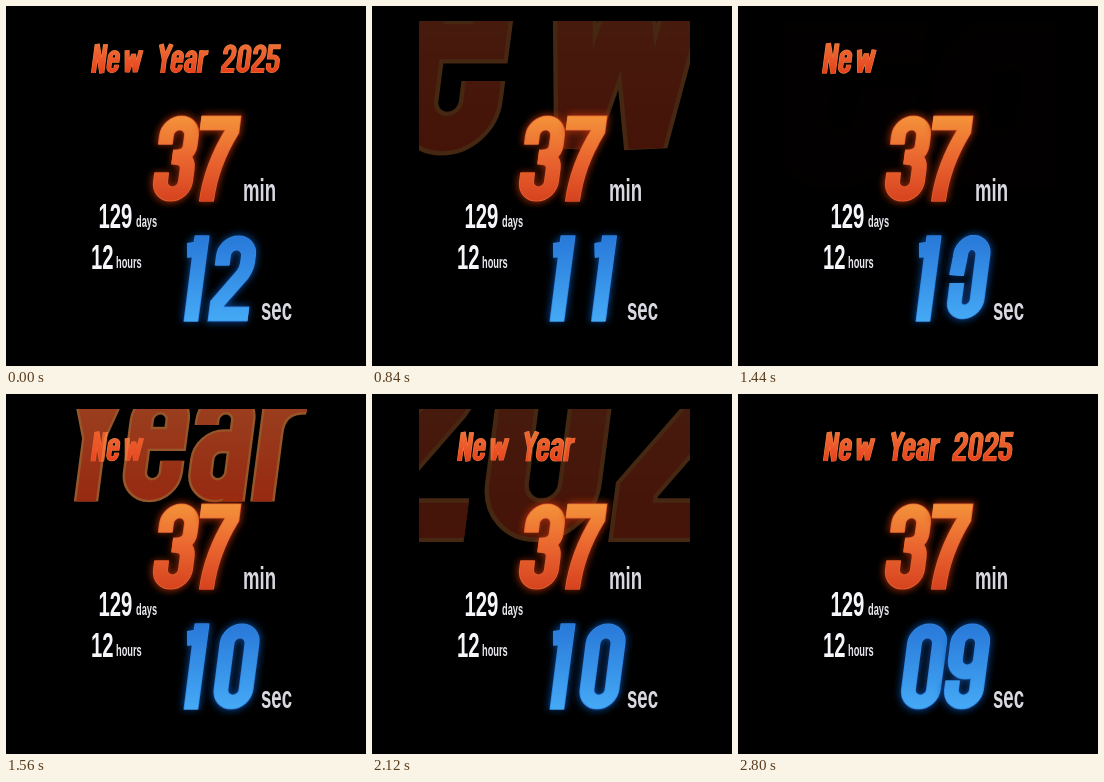
Animation, 360 px wide and 360 px high, one loop 2.88 s. Source, as an HTML page:

```html
<!DOCTYPE html>
<html lang="en">
<head>
<meta charset="utf-8">
<title>New Year countdown</title>
<style>
html, body { margin: 0; width: 100%; height: 100%; overflow: hidden; background: #000; }
svg { display: block; width: 100%; height: 100%; }
text { font-family: "Liberation Sans", Arial, sans-serif; font-weight: bold; }
path { fill: none; stroke-miterlimit: 4; }
</style>
</head>
<body>
<svg viewBox="0 0 360 360">
  <defs>
    <linearGradient id="warm" gradientUnits="userSpaceOnUse" x1="0" y1="0" x2="0" y2="86">
      <stop offset="0" stop-color="#f4933a"/><stop offset=".5" stop-color="#ea6630"/><stop offset="1" stop-color="#d6421f"/>
    </linearGradient>
    <linearGradient id="head" gradientUnits="userSpaceOnUse" x1="0" y1="0" x2="0" y2="86">
      <stop offset="0" stop-color="#ee7038"/><stop offset="1" stop-color="#e8401c"/>
    </linearGradient>
    <linearGradient id="cool" gradientUnits="userSpaceOnUse" x1="0" y1="0" x2="0" y2="86">
      <stop offset="0" stop-color="#2878d8"/><stop offset="1" stop-color="#45aaf6"/>
    </linearGradient>
    <filter id="glow" filterUnits="userSpaceOnUse" x="-60" y="-40" width="120" height="170">
      <feGaussianBlur stdDeviation="3.5"/>
    </filter>
    <clipPath id="stage"><rect x="47" y="15" width="271" height="304"/></clipPath>
  </defs>
  <rect width="360" height="360" fill="#000"/>
  <g id="title" clip-path="url(#stage)"></g>
  <g id="minutes"></g>
  <g id="seconds"></g>
  <g id="labels"></g>
</svg>
<script>
const LOOP = 2880, SLANT = 0.13, TITLE_SCALE = 0.335;
const $ = id => document.getElementById(id);

// Centre lines of the condensed letters: x around 0, y from 0 to 86
const GLYPHS = {
  0: 'M-12.5 43V20A12.5 12.5 0 0 1 12.5 20V66A12.5 12.5 0 0 1 -12.5 66Z',
  1: 'M-13 15L0 13V0V86',
  2: 'M-12.5 30V20A12.5 12.5 0 0 1 12.5 20V27Q12.5 33 9 39L-12.5 68V78.5H20',
  3: 'M-12.5 29V20A12.5 12.5 0 0 1 12.5 20V30Q12.5 41.5 -4 41.5Q12.5 41.5 12.5 53V66A12.5 12.5 0 0 1 -12.5 66V57',
  5: 'M17 7.5H-12.5V38H0A12.5 12.5 0 0 1 12.5 50.5V66A12.5 12.5 0 0 1 -12.5 66V57',
  7: 'M-20 7.5H12.5V16Q-4 50 -4 86',
  9: 'M-12.5 57V66A12.5 12.5 0 0 0 12.5 66V20A12.5 12.5 0 0 0 -12.5 20V36A12.5 12.5 0 0 0 12.5 36',
  N: 'M-12.5 86V0L12.5 86V0',
  e: 'M-11 47.5H11V36A11 11 0 0 0 -11 36V68A11 11 0 0 0 11 68V61',
  w: 'M-21 18L-12 83L0 30L12 83L21 18',
  Y: 'M-15 0L0 46L15 0M0 40V86',
  a: 'M-11 39V36A11 11 0 0 1 11 36V86M11 49H0A11 11 0 0 0 -11 60V68A11 11 0 0 0 11 68',
  r: 'M-8 86V18M-8 44Q-8 25 12 25'
};

function add(parent, tag, attrs) {
  const node = document.createElementNS('http://www.w3.org/2000/svg', tag);
  for (const k in attrs) node.setAttribute(k, attrs[k]);
  return parent.appendChild(node);
}

function slanted(x, y, s) {
  return `matrix(${s} 0 ${-SLANT * s} ${s} ${x + SLANT * 43 * s} ${y})`;
}

// One letter: optional glow, rim and gradient face
function letter(parent, look) {
  const g = add(parent, 'g', {});
  const layers = [];
  if (look.glow) layers.push(add(g, 'path', { stroke: look.glow, 'stroke-width': 18, filter: 'url(#glow)', opacity: 0.75 }));
  layers.push(add(g, 'path', { stroke: look.rim, 'stroke-width': 15 }));
  layers.push(add(g, 'path', { stroke: `url(#${look.face})`, 'stroke-width': look.inner }));
  return (d, x, y, s) => {
    layers.forEach(p => p.setAttribute('d', d));
    g.setAttribute('transform', slanted(x, y, s));
  };
}

const HEAD = { face: 'head', rim: '#e8843f', inner: 12 };
const WARM = { face: 'warm', rim: '#e0622c', inner: 13.4, glow: '#b8300f' };
const COOL = { face: 'cool', rim: '#2f86e2', inner: 13.4, glow: '#0f4fa8' };

const words = [
  { text: 'New', xs: [93.5, 107.7, 127], cx: 110.5 },
  { text: 'Year', xs: [158.5, 171.5, 185, 197.5], cx: 176.5 },
  { text: '2025', xs: [223, 238, 253, 267.5], cx: 245.5 }
];
for (const w of words) {
  w.g = add($('title'), 'g', {});
  [...w.text].forEach((c, i) => letter(w.g, HEAD)(GLYPHS[c], w.xs[i], 38.2, TITLE_SCALE));
}

letter($('minutes'), WARM)(GLYPHS[3], 170, 109.5, 1);
letter($('minutes'), WARM)(GLYPHS[7], 210, 109.5, 1);

function label(str, x, y, size, fill) {
  add($('labels'), 'text', { transform: `translate(${x} ${y}) scale(.58 1)`, 'font-size': size, fill }).textContent = str;
}
label('129', 92.5, 222, 35, '#f6f6fa');
label('days', 130, 221, 16, '#e8e8ee');
label('12', 85, 263, 35, '#f6f6fa');
label('hours', 110, 262, 16, '#e8e8ee');
label('min', 237, 195, 32, '#d8d8e0');
label('sec', 255, 314, 32, '#d8d8e0');

// Seconds: each slot morphs its centre line from one digit to the next
const counts = ['12', '11', '10', '09'];
const changes = [480, 1360, 2220], MORPH = 120;
const slots = [
  { draw: letter($('seconds'), COOL), x: { 1: 190.5, 0: 186 } },
  { draw: letter($('seconds'), COOL), x: { 2: 227, 1: 232, 0: 230.5, 9: 229 } }
];

const cache = {};
function sample(c) {
  if (!cache[c]) {
    const p = document.createElementNS('http://www.w3.org/2000/svg', 'path');
    p.setAttribute('d', GLYPHS[c]);
    const len = p.getTotalLength();
    cache[c] = Array.from({ length: 65 }, (_, i) => p.getPointAtLength(len * i / 64));
  }
  return cache[c];
}

const mix = (a, b, k) => a + (b - a) * k;
const clamp = v => Math.min(1, Math.max(0, v));
const decay = ms => 2 ** (-ms / 80);

function morph(a, b, k) {
  if (a === b || k >= 1) return GLYPHS[b];
  if (k <= 0) return GLYPHS[a];
  const to = sample(b);
  return 'M' + sample(a).map((p, i) =>
    mix(p.x, to[i].x, k).toFixed(2) + ' ' + mix(p.y, to[i].y, k).toFixed(2)).join('L');
}

function drawTitle(t) {
  words.forEach((w, i) => {
    const u = t - 800 - i * 640;
    let scale = 1, alpha = 0;
    if (u >= 0) {
      scale = u > 800 ? 1 : 1 + 11 * decay(u);
      alpha = u > 800 ? 1 : 1 - decay(u);
    } else if (t < 700) {
      alpha = decay(Math.max(0, t - 60));
    }
    w.g.setAttribute('opacity', alpha);
    w.g.setAttribute('transform', `translate(${w.cx} 56.5) scale(${scale}) translate(${-w.cx} -56.5)`);
  });
}

function drawSeconds(t) {
  const n = changes.filter(c => t >= c).length;
  const from = counts[Math.max(0, n - 1)], to = counts[n];
  const u = n ? clamp((t - changes[n - 1]) / MORPH) : 1;
  const k = 1 - (1 - u) ** 2;
  slots.forEach((s, i) => s.draw(morph(from[i], to[i], k), mix(s.x[from[i]], s.x[to[i]], k), 229.5, 1));
}

function render(t) {
  drawTitle(t);
  drawSeconds(t);
}

const start = performance.now();
function tick(now) {
  render(Math.max(0, now - start) % LOOP);
  requestAnimationFrame(tick);
}
render(0);
requestAnimationFrame(tick);
</script>
</body>
</html>
```
